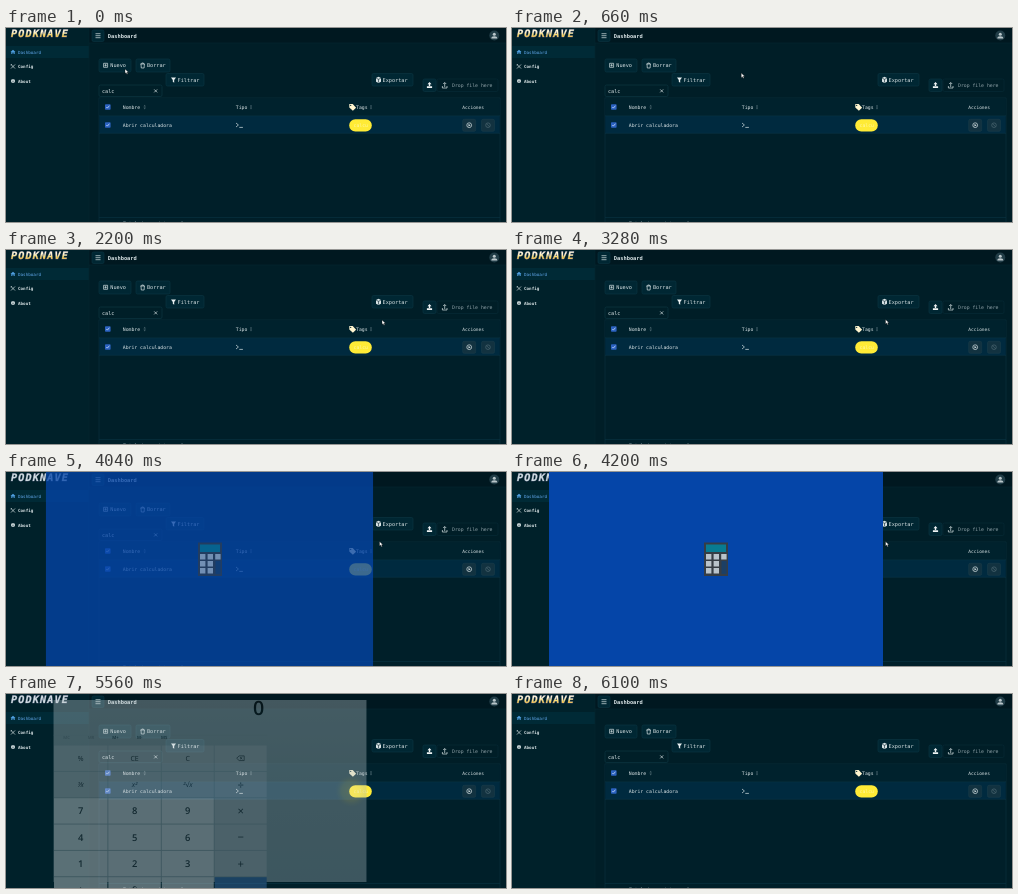
An HTML page that plays this animation: 500x194 px, repeating every 6.12 s.

```html
<!DOCTYPE html>
<html lang="es">
<head>
<meta charset="utf-8">
<title>Dashboard</title>
<style>
html, body { margin: 0; width: 100%; height: 100%; overflow: hidden; background: #001e27; }
svg { display: block; width: 100vw; height: 100vh; }
text { font: 4.8px "DejaVu Sans Mono", monospace; fill: #d7e2e4; text-rendering: geometricPrecision; }
.big { font-size: 5.2px; }
.side { font-size: 4.25px; font-weight: bold; }
.dim { fill: #8fa3a9; }
.calc text { font-family: "Open Sans", "Noto Sans", sans-serif; text-anchor: middle; fill: #30363a; }
.btn { fill: #002733; stroke: #0c3644; stroke-width: .6; }
.act { fill: #123240; stroke: #1a3d4b; stroke-width: .6; }
.line { fill: none; stroke: #d7e2e4; stroke-width: .7; }
.faint { stroke: #4d6872; }
#logo { font-size: 10.2px; font-weight: bold; font-style: italic; letter-spacing: 1.1px; stroke-width: .6; paint-order: stroke; }
</style>
</head>
<body>
<svg viewBox="0 0 500 194" preserveAspectRatio="none">
  <defs>
    <linearGradient id="gold" x2="0" y2="1">
      <stop offset=".25" stop-color="#fff6d8"/><stop offset=".55" stop-color="#f5d75c"/><stop offset=".85" stop-color="#e39a63"/>
    </linearGradient>
    <linearGradient id="glass" x2="0" y2="1">
      <stop stop-color="#b7c5ca"/><stop offset=".5" stop-color="#abbabf"/><stop offset="1" stop-color="#a6b5bb"/>
    </linearGradient>
    <radialGradient id="glow">
      <stop offset=".2" stop-color="#e5e09c"/><stop offset=".6" stop-color="#d8d9a4" stop-opacity=".8"/><stop offset="1" stop-color="#b5c2b8" stop-opacity="0"/>
    </radialGradient>
  </defs>

  <path fill="#001e27" d="M0 0h500v194H0z"/>
  <path fill="#00212a" d="M0 0h83v194H0z"/>
  <path fill="#001820" d="M83 0h417v15H83z"/>
  <path fill="#002a36" d="M0 18h83v12H0z"/>
  <path fill="none" stroke="#04272f" stroke-width=".6" d="M83 0v194M83 15h417"/>

  <text id="logo" x="5" y="9.2" stroke="#6d7193">PODKNAVE</text>
  <path fill="#4f9fe0" d="M4.5 24l2.5-2.3 2.5 2.3h-.8v2H7.6v-1.4H6.4V26H5.3v-2z"/>
  <text x="12" y="25.7" style="font-size:4.25px;fill:#62aaf0">Dashboard</text>
  <path class="line" d="M5 36.5l4 4M9 36.5l-4 4M4.8 37.2l1.2-1"/>
  <text class="side" x="12" y="40.2">Config</text>
  <circle cx="7" cy="53" r="2" fill="#d7e2e4"/><path stroke="#00212a" stroke-width=".7" d="M7 52.7v1.6M7 51.5v.6"/>
  <text class="side" x="12" y="54.6">About</text>

  <rect class="btn" x="86" y="2" width="12" height="11.5" rx="1.5"/>
  <path class="line" d="M89.5 5.7h5M89.5 7.7h5M89.5 9.7h5"/>
  <text x="101.8" y="9.6" style="font-size:5.35px;font-weight:bold">Dashboard</text>
  <circle cx="488.3" cy="7.5" r="5" fill="#213d47"/>
  <circle cx="488.3" cy="6.2" r="1.5" fill="#b9c6ca"/><path fill="#b9c6ca" d="M485.3 10.6q0-2.4 3-2.4t3 2.4z"/>

  <rect class="btn" x="93" y="31" width="32" height="13" rx="1.5"/>
  <path class="line" d="M97.6 35.3h4v4h-4zM98.4 37.3h2.4M99.6 36.1v2.4"/>
  <text class="big" x="104.3" y="39.4">Nuevo</text>
  <rect class="btn" x="130" y="31" width="34" height="13" rx="1.5"/>
  <path class="line" d="M134.3 36h4.6M135.8 36v-1h1.6v1M135 36l.3 4h2.8l.3-4"/>
  <text class="big" x="140.9" y="39.4">Borrar</text>
  <rect class="btn" x="160" y="45.5" width="38" height="12.5" rx="1.5"/>
  <path fill="#e8eff0" d="M165 49.5h5l-1.8 2.4v2.8l-1.4-1v-1.8z"/>
  <text class="big" x="171.6" y="53.5">Filtrar</text>
  <rect class="btn" x="366" y="45.5" width="41" height="12.5" rx="1.5"/>
  <path fill="#d7e2e4" d="M370 50l2.5-1.2L375 50v3.8l-2.5 1.1-2.5-1.1z"/><path stroke="#001e27" stroke-width=".6" fill="none" d="M370.2 50.3l2.3 1 2.3-1M372.5 51.3v3.2"/>
  <text class="big" x="376.6" y="53.5">Exportar</text>
  <rect class="btn" x="417" y="51" width="13" height="12.5" rx="1.5"/>
  <path fill="#eef3f4" d="M423.5 54l2 2.2h-1.3v1.9h-1.4v-1.9h-1.3zM420.9 58.2h5.2V60h-5.2z"/>
  <rect x="431" y="51" width="61" height="12.5" rx="1.5" fill="none" stroke="#082f3a" stroke-width=".5"/>
  <path class="line" d="M438.7 59v-4M437.2 56l1.5-1.6 1.5 1.6M436.4 58v2h4.6v-2"/>
  <text class="dim" x="446" y="59">Drop file here</text>
  <rect x="93" y="57" width="63" height="11.5" rx="1.5" fill="#001f28" stroke="#0e3946" stroke-width=".6"/>
  <text class="big" x="96" y="64.5">calc</text>
  <path class="line" d="M148.2 61.4l3 3M151.2 61.4l-3 3"/>

  <rect x="93" y="70" width="401" height="130" fill="#001f29" stroke="#0b3440" stroke-width=".6"/>
  <path fill="#00222d" d="M93.3 70.3h400.4v17.5H93.3z"/>
  <path fill="#002a3f" d="M93.3 88h400.4v17.3H93.3z"/>
  <path stroke="#0a3543" stroke-width=".6" d="M93 87.8h401M93 105.3h401M93 189.5h401"/>
  <g id="checks"></g>
  <text x="116.8" y="80.8">Nombre</text><text x="229.8" y="80.8">Tipo</text>
  <text x="350" y="80.8">Tags</text><text x="456.3" y="80.8" style="font-size:4.5px">Acciones</text>
  <path fill="#fff5cf" d="M343.3 76h3.4l3.4 3.7-3.2 3-3.6-3.3z"/><circle cx="344.7" cy="77.4" r=".6" fill="#00222d"/>
  <path id="sorts" fill="#46626b"/>
  <text x="116.8" y="98.9">Abrir calculadora</text>
  <path class="line" stroke-width="1" d="M230 95l2.4 2-2.4 2M233.3 99.4h3.6"/>
  <rect x="343.2" y="91.2" width="22.6" height="12.3" rx="6.1" fill="#ffeb36"/>
  <text x="347.5" y="98.9" style="fill:#fff6a0">calcu</text>
  <rect class="act" x="456.7" y="91.3" width="13" height="12" rx="1.5"/>
  <circle class="line" cx="463.2" cy="97.2" r="2.4"/><path fill="#d7e2e4" d="M462.5 95.9l2.1 1.3-2.1 1.3z"/>
  <rect class="act" x="475.5" y="91.3" width="13" height="12" rx="1.5"/>
  <circle class="line faint" cx="482" cy="97.2" r="2.3"/><path class="line faint" d="M480.5 95.7l3 3"/>
  <text class="dim" x="117" y="196.6">Total de registros: 1</text>

  <rect id="pane" height="194" fill="#0545a8"/>
  <g id="icon">
    <path fill="#363d45" d="M192 70.5h24v33.5h-24z"/><path fill="#087b92" d="M194 72.5h20v7.5h-20z"/>
    <path id="pads" fill="#b9c3cb"/>
    <path fill="#1c3f65" d="M209.5 89h5v13h-5z"/>
  </g>

  <g id="calc" class="calc">
    <path fill="url(#glass)" d="M37 0h334v194H37z"/>
    <circle cx="355" cy="97" r="18" fill="url(#glow)"/>
    <path fill="#a9b8be" opacity=".35" d="M37 37h228v1H37z"/>
    <text x="256" y="16" style="font-size:21px;font-weight:600;fill:#111">0</text>
    <g id="keys"></g>
  </g>

  <path id="cursor" fill="#fff" stroke="#000" stroke-width=".35" d="M0 0v4.6l1.1-1 .8 1.7.9-.4-.8-1.6h1.5z"/>
</svg>
<script>
const LOOP = 6120;
const el = id => document.getElementById(id);
const clamp = v => Math.max(0, Math.min(1, v));
const ramp = (t, a, b) => clamp((t - a) / (b - a));
const ease = p => p * p * (3 - 2 * p);
const mix = (a, b, p) => a + (b - a) * p;

el('checks').innerHTML = [79, 97].map(y =>
  `<rect x="99" y="${y - 2.8}" width="5.6" height="5.6" rx=".8" fill="#2b62c0"/>
   <path d="M100.3 ${y}l1.1 1.1 2-2.4" fill="none" stroke="#dceaff" stroke-width=".7"/>`).join('');
el('sorts').setAttribute('d', [138.7, 245, 365].map(x =>
  `M${x - 1.2} 78.6h2.4l-1.2-1.8zM${x - 1.2} 79.6h2.4l-1.2 1.8z`).join(''));

let pads = '';
for (let r = 0; r < 3; r++)
  for (let c = 0; c < (r ? 2 : 3); c++) pads += `M${194 + c * 7.6} ${82 + r * 7}h5.4v5.5h-5.4z`;
el('pads').setAttribute('d', pads);

// Calculator keypad
const rows = ['% CE C ⌫', '⅟x x² ²√x ÷', '7 8 9 ×', '4 5 6 −', '1 2 3 +', '± 0 , ='];
const edges = [37, 95, 152, 208.5, 265];
let keys = ['MC', 'MR', 'M+', 'M-', 'MS'].map((s, i) =>
  `<text x="${51 + i * 26}" y="41.2" style="font-size:4.6px;font-weight:600" opacity="${i < 2 ? .3 : 1}">${s}</text>`).join('');
rows.forEach((row, r) => row.split(' ').forEach((label, c) => {
  const x = edges[c], w = edges[c + 1] - x, y = 48 + r * 28.1;
  const digit = r > 1 && c < 3;
  const fill = label === '=' ? '#4b7fc4' : digit ? '#f4f6f7' : '#cbd3d8';
  const size = digit ? 10 : c === 3 && r ? 12 : 7.5;
  const style = `font-size:${size}px;font-weight:${digit ? 600 : 400}${r === 1 && c < 3 ? ';font-style:italic' : ''}`;
  keys += `<rect x="${x + .5}" y="${y + .5}" width="${w - 1}" height="27.1" fill="${fill}"/>`;
  keys += label === '⌫'
    ? `<path d="M232.5 62l2.6-2.5h5.4v5h-5.4zM236 60.8l2.5 2.4M238.5 60.8l-2.5 2.4" fill="none" stroke="#30363a" stroke-width=".7"/>`
    : `<text x="${x + w / 2}" y="${y + 14 + size * .36}" style="${style}">${label}</text>`;
}));
el('keys').innerHTML = keys;

// Pointer stops: time, x, y
const path = [
  [0, 119, 41], [80, 119, 41], [660, 229, 45], [1250, 370, 75], [1700, 463, 97],
  [1950, 463, 97], [2200, 376, 70], [2400, 373.5, 69.5], [4350, 373.5, 69.5], [4650, 366, -8], [LOOP, 366, -8]
];

function draw(t) {
  const i = Math.max(1, path.findIndex(p => p[0] > t));
  const [a, b] = [path[i - 1], path[i]];
  const p = ramp(t, a[0], b[0]);
  el('cursor').setAttribute('transform', `translate(${mix(a[1], b[1], p)} ${mix(a[2], b[2], p)})`);

  // Splash window, then the keypad over it
  const grow = ease(ramp(t, 3940, 4070));
  const left = mix(60, 37, grow), right = mix(340, 371, grow);
  const shown = t < 4700;
  el('pane').setAttribute('x', left);
  el('pane').setAttribute('width', right - left);
  el('pane').setAttribute('opacity', shown ? ramp(t, 3940, 4070) : 0);
  el('icon').setAttribute('opacity', shown ? ramp(t, 3980, 4080) : 0);

  const close = ramp(t, 5460, 5620);
  const s = 1 - .1 * close;
  el('calc').setAttribute('opacity', ramp(t, 4480, 4660) * (1 - close));
  el('calc').setAttribute('transform', `translate(${204 * (1 - s)} ${97 * (1 - s)}) scale(${s})`);
  el('logo').style.fill = t > 3960 && t < 5620 ? '#cfdce0' : 'url(#gold)';
}

const start = performance.now();
function tick() {
  draw((performance.now() - start) % LOOP);
  requestAnimationFrame(tick);
}
tick();
</script>
</body>
</html>
```
